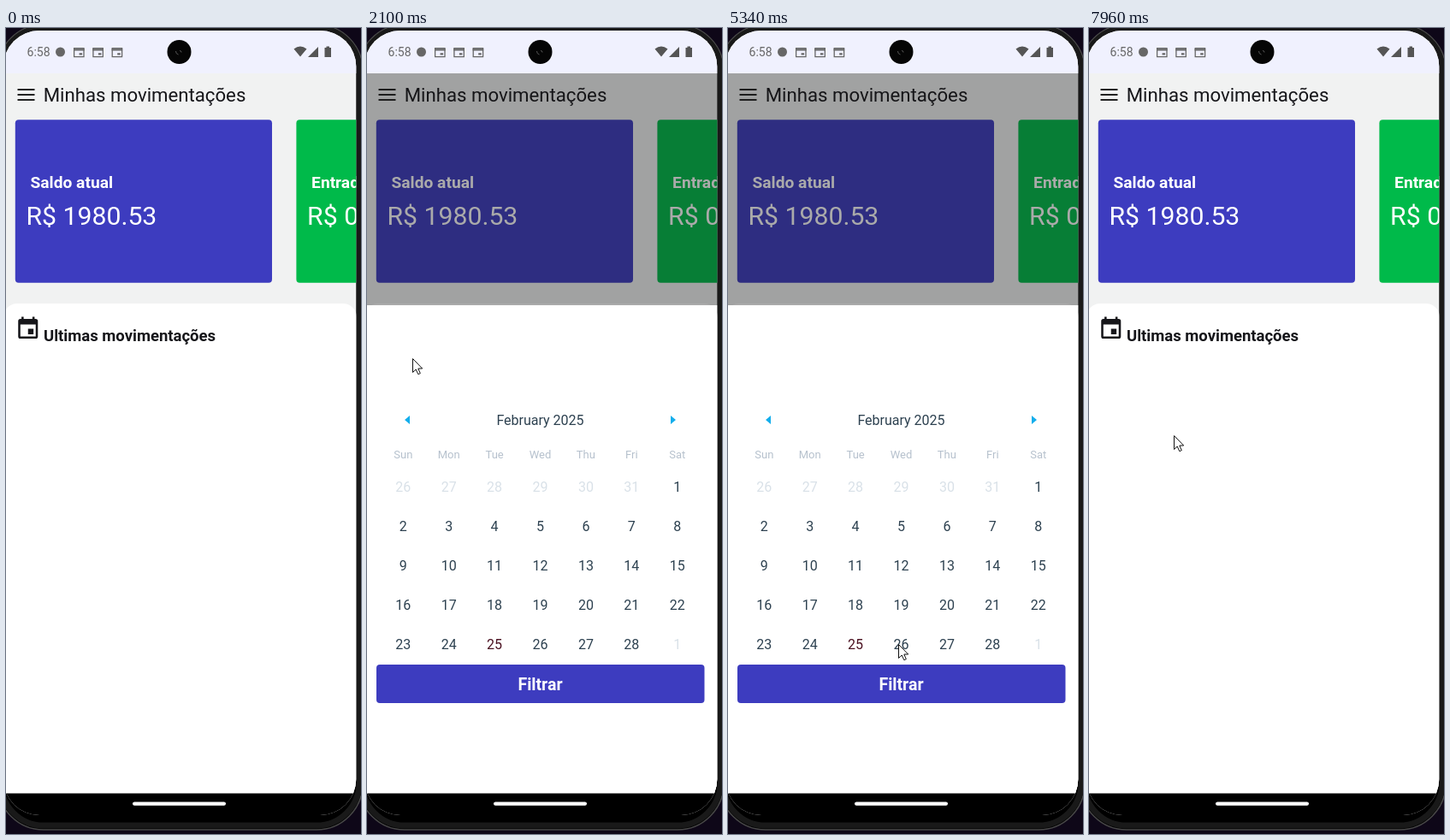
Animation, 415 px wide and 942 px high, one loop 8000 ms. Source, as an HTML page:

```html
<!DOCTYPE html>
<html lang="pt">
<head>
<meta charset="utf-8">
<title>Minhas movimentações</title>
<style>
  html, body { margin: 0; width: 100%; height: 100%; overflow: hidden; background: #0e0718; }
  svg { display: block; width: 100%; height: 100%; font-family: Roboto, "Open Sans", sans-serif; }
  .bold { font-weight: 700; }
  .mid { text-anchor: middle; }
</style>
</head>
<body>
<svg viewBox="0 0 415 942">
  <defs>
    <clipPath id="screen"><rect x="-3" y="3" width="412.3" height="917" rx="42"/></clipPath>
  </defs>

  <!-- phone body -->
  <rect x="-10" y="-4" width="427" height="941" rx="54" stroke="#484848" stroke-width="1.5"/>
  <rect x="-6" width="419" height="932" rx="50" fill="none" stroke="#191919" stroke-width="7"/>

  <g clip-path="url(#screen)">
    <rect x="-3" width="413" height="895" fill="#f1f2f2"/>
    <rect x="-3" width="413" height="53" fill="#f0f1fe"/>

    <!-- status bar -->
    <g fill="#666">
      <text x="24.6" y="33" font-size="14">6:58</text>
      <circle cx="63.5" cy="28" r="5.5"/>
      <path d="M336.5 24.5Q344 18.5 351.5 24.5L344 33.5ZM365 22V34H353ZM372.5 23h2v-1.5h3.5V23h2v11h-7.5Z" fill="#555"/>
    </g>
    <g id="windows" fill="none" stroke="#666" stroke-width="1.3"></g>
    <circle cx="202.5" cy="28" r="14" fill="#050505"/>
    <path d="M198.5 27a4 4 0 0 0 3 4M203 26.5a2 2 0 0 1 2 2" fill="none" stroke="#555"/>

    <!-- header, cards and list sheet -->
    <path d="M13.5 72h20m-20 6h20m-20 6h20" stroke="#222" stroke-width="2"/>
    <text x="43.7" y="86" font-size="22.2" fill="#16161a">Minhas movimentações</text>
    <g id="cards"></g>
    <rect x="-3" y="322" width="413" height="620" rx="16" fill="#fff"/>
    <path id="icon" transform="translate(10.4 336.2) scale(1.28)" fill="#16161a" d="M17 12h-5v5h5zM16 1v2H8V1H6v2H5a2 2 0 0 0-2 2v14a2 2 0 0 0 2 2h14a2 2 0 0 0 2-2V5a2 2 0 0 0-2-2h-1V1zM19 19H5V8h14z"/>
    <text class="bold" x="44" y="366" font-size="18.5" fill="#16161a">Ultimas movimentações</text>

    <!-- date picker -->
    <g id="modal">
      <rect x="-3" y="53" width="413" height="271" fill="#141414" opacity=".36"/>
      <rect x="-3" y="324" width="413" height="571" fill="#fff"/>
      <path d="M50 453v10l-6-5ZM355 453v10l6-5Z" fill="#14aeec"/>
      <circle id="dot" cx="202.5" cy="720.5" r="16" fill="#00adf5"/>
      <g id="days" class="mid"></g>
      <g id="button">
        <rect x="11" y="744" width="383.5" height="45" rx="4" fill="#3d3cbf"/>
        <text class="bold mid" x="202.5" y="774" font-size="19.5" fill="#fff">Filtrar</text>
      </g>
    </g>

    <rect x="-3" y="894.5" width="413" height="48"/>
  </g>
  <rect x="148" y="904.4" width="109" height="4.4" rx="2.2" fill="#fff"/>
  <path id="cursor" d="M.5 .5v16l3.700-3.500 2.600 5.700 2.500-1.100-2.500-5.600h4.900Z" fill="#fff" stroke="#111"/>
</svg>

<script>
const LOOP = 8000;
const $ = id => document.getElementById(id);

function add(parent, tag, attrs, label = "") {
  const el = document.createElementNS("http://www.w3.org/2000/svg", tag);
  for (const name in attrs) el.setAttribute(name, attrs[name]);
  el.textContent = label;
  $(parent).append(el);
  return el;
}

for (let x = 79; x < 130; x += 22.3) {
  add("windows", "path", { d: `M${x + .6} 23.6h11.4v10h-11.4Z` });
  add("windows", "path", { d: `M${x} 25.3h12.6m-6 5h3.500`, "stroke-width": 2.3 });
}

function addCard(x, fill, name, amount) {
  add("cards", "rect", { x, y: 107.3, width: 300.2, height: 190.5, rx: 4, fill });
  add("cards", "text", { x: x + 17.7, y: 187, class: "bold", "font-size": 19.2, fill: "#fff" }, name);
  add("cards", "text", { x: x + 12.7, y: 230, "font-size": 30.2, fill: "#fff" }, amount);
}
addCard(10.8, "#3d3cbf", "Saldo atual", "R$ 1980.53");
addCard(339.4, "#00ba4a", "Entradas", "R$ 0.00");

const addDay = (col, y, size, fill, label) =>
  add("days", "text", { x: 42.3 + 53.4 * col, y, "font-size": size, fill }, label);

addDay(3, 464, 16, "#2d4150", "February 2025");
"Sun Mon Tue Wed Thu Fri Sat".split(" ").forEach((d, i) => addDay(i, 503, 13, "#b6c1cd", d));
const days = Array.from({ length: 35 }, (_, i) => {
  const date = new Date(2025, 1, i - 5);
  const day = date.getDate();
  const fill = date.getMonth() !== 1 ? "#d9e1e8" : day === 25 ? "#4a1020" : "#2d4150";
  return addDay(i % 7, 542 + 46 * Math.floor(i / 7), 16, fill, day);
});
const picked = days[31];

// Pointer moves: start time, end time, end point. It rests in between.
const moves = [
  [70, 600, 24, 500], [600, 880, 65, 458], [880, 1400, 27, 352],
  [1700, 2100, 53, 386], [2100, 2770, 229, 616], [2910, 3310, 246, 585], [3310, 3440, 251, 581],
  [3770, 4540, 359, 662], [4540, 5340, 199, 720], [5600, 5900, 239, 782],
  [6400, 7150, 3, 347], [7150, 7350, 25, 349], [7550, 7960, 99, 476]
];

const ramp = (t, from, to) => Math.min(1, Math.max(0, (t - from) / (to - from)));
const pulse = (t, on, off, fade) => ramp(t, on, on + fade) - ramp(t, off, off + fade);
const setOpacity = (id, value) => $(id).setAttribute("opacity", value);

function draw(t) {
  let x = 374, y = 944;
  for (const [from, to, endX, endY] of moves) {
    const p = ramp(t, from, to);
    x += (endX - x) * p;
    y += (endY - y) * p;
  }
  $("cursor").setAttribute("transform", `translate(${Math.round(x)} ${Math.round(y)})`);

  setOpacity("icon", 1 - .8 * (pulse(t, 1360, 1630, 120) + pulse(t, 7530, 7700, 120)));
  setOpacity("modal", pulse(t, 1650, 6070, 290));
  setOpacity("button", 1 - .8 * ramp(t, 5940, 6060));
  const selected = t >= 5540;
  setOpacity("dot", selected ? 1 : 0);
  picked.setAttribute("fill", selected ? "#fff" : "#2d4150");
}

const start = performance.now();
function tick() {
  draw((performance.now() - start) % LOOP);
  requestAnimationFrame(tick);
}
tick();
</script>
</body>
</html>
```
